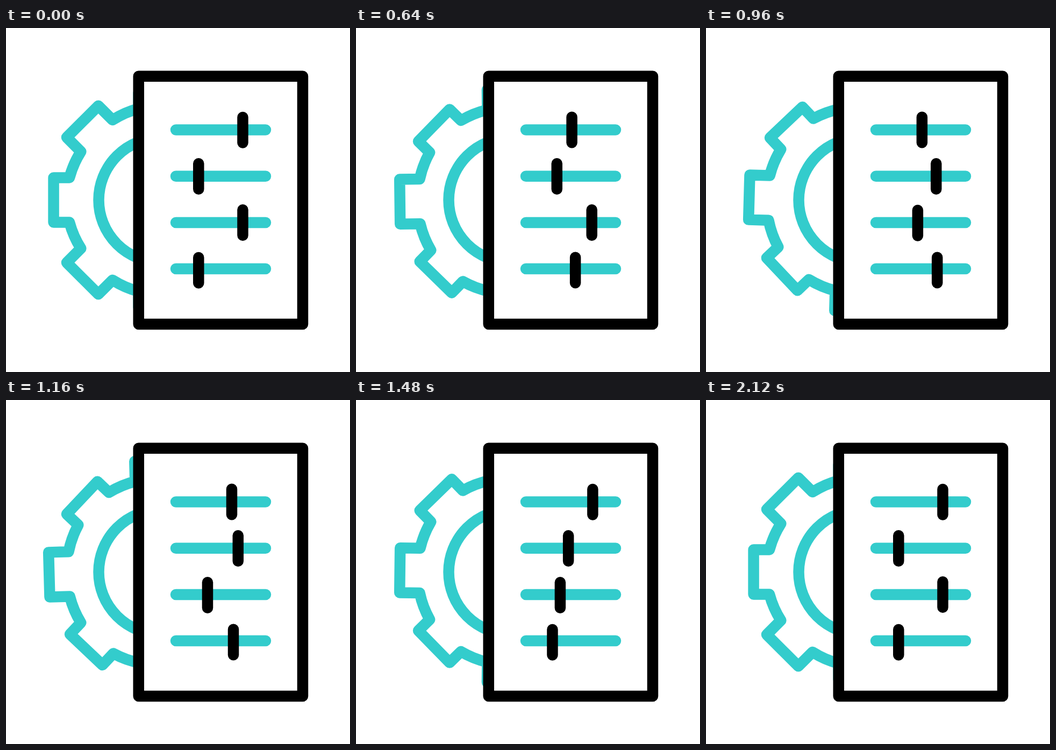
Animation of 640 by 640 pixels, one loop 2160 ms. Source, as an HTML page:

```html
<!DOCTYPE html>
<html lang="en">
<head>
<meta charset="utf-8">
<title>Settings</title>
<style>
  html, body { margin: 0; width: 100%; height: 100%; overflow: hidden; background: #fff; }
  svg { display: block; width: 100%; height: 100%; }
  .line { fill: none; stroke-width: 20.5; stroke-linecap: round; stroke-linejoin: round; }
  .teal { stroke: #3cc; }
  .black { stroke: #000; }
</style>
</head>
<body>
<svg viewBox="0 0 640 640">
  <path id="gear" class="line teal"/>
  <circle class="line teal" cx="288.3" cy="320" r="115.8"/>
  <rect class="line black" style="fill:#fff" x="246.75" y="89.75" width="305.25" height="461.25"/>
  <path class="line teal" d="M316 189.6H483M316 275.8H483M316 362H483M316 448.1H483"/>
  <g id="knobs"></g>
</svg>
<script>
  const LOOP = 2160, SPIN = 2120, FRAME = 40;
  const OUT = 760, BACK = 720;
  const PIVOT = { x: 287.25, y: 320 }, HUB = { x: 288.25, y: 320 };

  // x, y: top of the knob; dx, dy: travel; start: ms
  const knobs = [
    { x: 440.5, y: 166, dx: -41, dy: -0.3, start: 40 },
    { x: 358.3, y: 252.2, dx: 73.7, dy: 0, start: 360 },
    { x: 440.5, y: 338.3, dx: -67.3, dy: 1, start: 520 },
    { x: 358.3, y: 427, dx: 71.9, dy: -0.3, start: 200 }
  ];

  // Same curve as cubic-bezier(.62, 0, .38, 1)
  function ease(x) {
    if (x <= 0) return 0;
    if (x >= 1) return 1;
    let lo = 0, hi = 1, s = 0.5;
    for (let i = 0; i < 24; i++) {
      s = (lo + hi) / 2;
      const u = 1 - s;
      const at = 1.86 * s * u * u + 1.14 * s * s * u + s * s * s;
      if (at < x) lo = s; else hi = s;
    }
    return s * s * (3 - 2 * s);
  }

  // Eight teeth; the diagonal ones stand taller
  function gearPath() {
    const half = 41.6;
    let d = '';
    for (let i = 0; i < 8; i++) {
      const a = i * Math.PI / 4, c = Math.cos(a), s = Math.sin(a);
      const [root, tip] = i % 2 ? [169, 206.3] : [170.2, 199.7];
      const at = (r, w) => (HUB.x + r * c - w * s).toFixed(2) + ' ' + (HUB.y + r * s + w * c).toFixed(2);
      d += (i ? 'A175 175 0 0 1 ' : 'M') + at(root, -half) +
        'L' + at(tip, -half) + 'L' + at(tip, half) + 'L' + at(root, half);
    }
    const [x, y] = [HUB.x + 170.2, HUB.y - half];
    return d + `A175 175 0 0 1 ${x} ${y}Z`;
  }

  const gear = document.getElementById('gear');
  gear.setAttribute('d', gearPath());

  for (const k of knobs) {
    k.el = document.createElementNS('http://www.w3.org/2000/svg', 'path');
    k.el.setAttribute('class', 'line black');
    k.el.setAttribute('d', `M${k.x} ${k.y}v47.5`);
    document.getElementById('knobs').append(k.el);
  }

  function draw(t) {
    gear.setAttribute('transform', `rotate(${360 * ease(t / SPIN)} ${PIVOT.x} ${PIVOT.y})`);
    for (const k of knobs) {
      const p = t - k.start;
      const shift = p < OUT ? ease(p / OUT) : 1 - ease((p - OUT) / BACK);
      k.el.setAttribute('transform', `translate(${k.dx * shift} ${k.dy * shift})`);
    }
  }

  // Poses hold for one frame each; the small lead absorbs clock jitter
  const begin = performance.now();
  function tick() {
    const t = performance.now() - begin + 8;
    draw(Math.floor(t / FRAME) * FRAME % LOOP);
    requestAnimationFrame(tick);
  }
  draw(0);
  requestAnimationFrame(tick);
</script>
</body>
</html>
```
